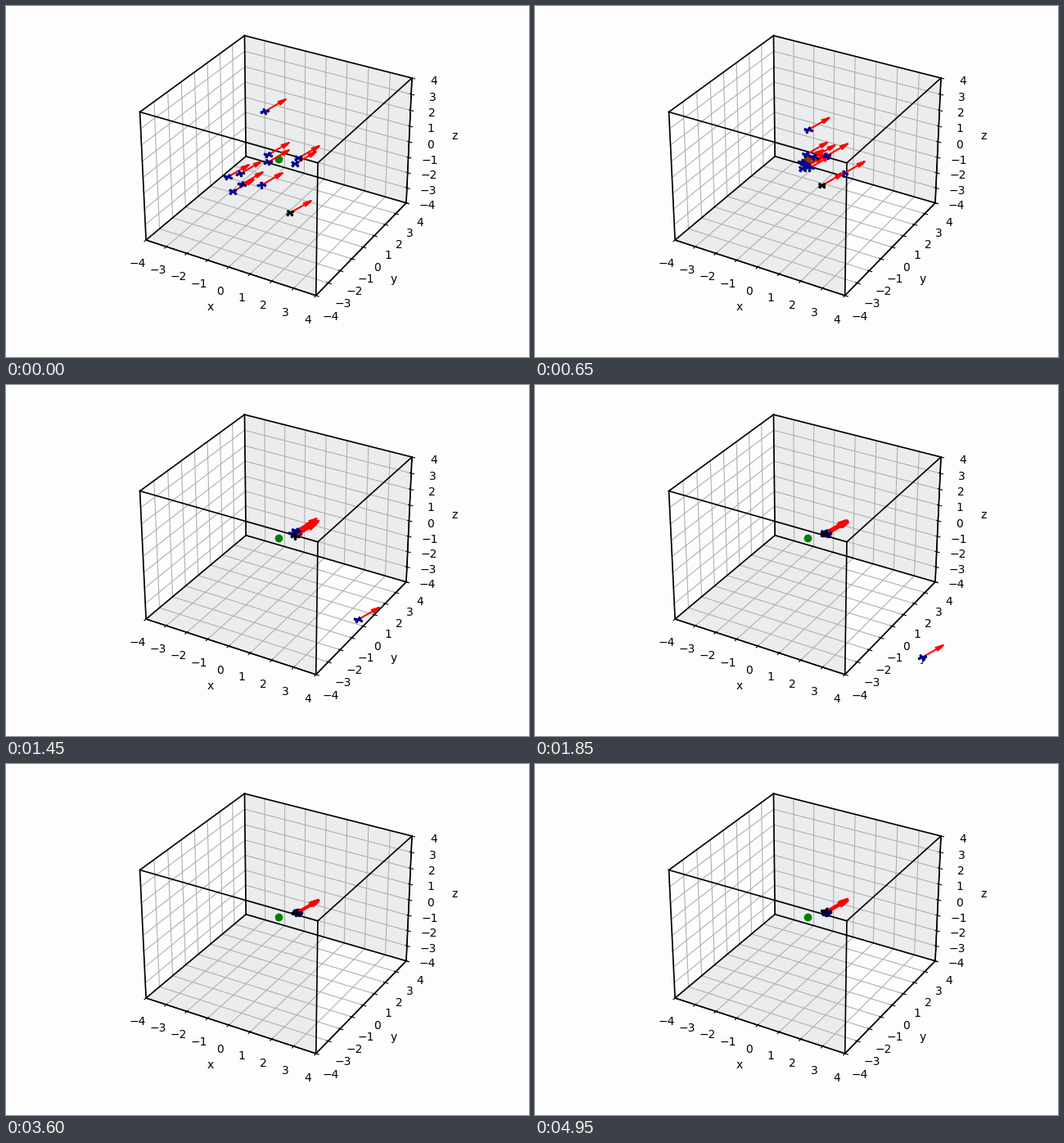
Animation of 639x429 px, one loop 5 s. Source, as a matplotlib script:

```python
import itertools

import matplotlib.pyplot as plt
import numpy as np
from matplotlib.animation import FuncAnimation
from mpl_toolkits.mplot3d import proj3d

W, H, DPI = 639, 429, 100
FRAMES, STEP = 100, 50
PAPER, SHADE = "#fdfdfd", "#ebecee"
LIM = 4

fig = plt.figure(figsize=(W / DPI, H / DPI), dpi=DPI, facecolor=PAPER)


def pixel_axes(zorder):
    """Full-stage axes in pixels with y pointing down."""
    layer = fig.add_axes([0, 0, 1, 1], zorder=zorder)
    layer.set(xlim=(0, W), ylim=(H, 0))
    layer.axis("off")
    return layer


# Room with ticks, grid and outline
back = pixel_axes(-1)
side = 369.6
room = fig.add_axes([143.2 / W, 51.8 / H, side / W, side / H], projection="3d")
room.set_facecolor("none")
room.set(xlim=(-LIM, LIM), ylim=(-LIM, LIM), zlim=(-LIM, LIM),
         xlabel="x", ylabel="y", zlabel="z")
for axis in (room.xaxis, room.yaxis, room.zaxis):
    axis.set_pane_color((1, 1, 1, 0))
    axis.set_ticks(range(-LIM, LIM + 1))

corners = list(itertools.product((-LIM, LIM), repeat=3))
for p, q in itertools.combinations(corners, 2):
    if sum(a != b for a, b in zip(p, q)) == 1:
        room.plot(*zip(p, q), color="black", lw=1.2)


def to_pixels(x, y, z):
    u, v, _ = proj3d.proj_transform(x, y, z, room.get_proj())
    px, py = room.transData.transform((u, v))
    return np.array([px, H - py])


far_left, far_right = to_pixels(-LIM, LIM, -LIM), to_pixels(LIM, LIM, -LIM)
near_left, near_right = to_pixels(-LIM, -LIM, -LIM), to_pixels(LIM, -LIM, -LIM)
near_top = to_pixels(LIM, -LIM, LIM)

# Where the front upright crosses the far floor edge
s, _ = np.linalg.solve(np.column_stack([far_right - far_left, near_right - near_top]),
                       near_right - far_left)
crossing = far_left + s * (far_right - far_left)
wall = [to_pixels(-LIM, LIM, LIM), to_pixels(LIM, LIM, LIM), far_right, far_left]
floor = [near_left, far_left, crossing, near_right]
for shape in (wall, floor):
    back.fill(*np.array(shape).T, color=SHADE, lw=0)

# Swarm: start point and time scale of the approach; the last one is black
top = pixel_axes(1)
top.plot(*to_pixels(0, 0, 0), "o", color="green", ms=6, zorder=1)

STARTS = np.array([(316, 129), (320, 182), (320, 191), (357, 186), (271, 209),
                   (286, 205), (288, 218), (277, 227), (312, 219), (347, 253)])
SCALES = np.array([853, 1050, 700, 700, 640, 680, 650, 660, 720, 820])
GOAL = np.array([355, 181.5])
ESCAPE_T = (0, 550, 650, 1050, 1100, 1650, 1850, 2000)
ESCAPE_X = (353, 374, 377, 393, 397, 449, 473, 487)
ESCAPE_Y = (193, 201, 205, 239, 243, 312, 333, 356)

ARROW = np.array([25.5, -14.8])
NORMAL = np.array([14.8, 25.5]) / 29.5
BARB = 0.7 * ARROW

rng = np.random.default_rng(4)
count = len(STARTS) + 1
spread = rng.uniform(-1.6, 1.6, (count, 2)) * (1, 0.6)
spread[-1] = -1, -0.3
jitter = rng.normal(0, 0.45, (FRAMES, count, 2))
yaw = rng.uniform(0, np.pi, (FRAMES, count))


class Drone:
    def __init__(self, color, order):
        self.arms = [top.plot([], [], color=color, lw=1.9, zorder=order)[0]
                     for _ in range(2)]
        self.rotors, = top.plot([], [], "o", color=color, ms=2.1, mec="black",
                                mew=0.35, zorder=order)
        self.arrow, = top.plot([], [], color="red", lw=1.5, zorder=order - 0.5)
        self.parts = [*self.arms, self.rotors, self.arrow]

    def place(self, pos, angle):
        angles = angle + np.arange(4) * np.pi / 2
        tips = pos + np.column_stack([4.1 * np.cos(angles), 2.6 * np.sin(angles)])
        for arm, ends in zip(self.arms, (tips[::2], tips[1::2])):
            arm.set_data(*ends.T)
        self.rotors.set_data(*tips.T)
        tip = pos + ARROW
        points = [pos, tip, pos + BARB + 2 * NORMAL, tip, pos + BARB - 2 * NORMAL]
        self.arrow.set_data(*np.array(points).T)

    def show(self, on):
        for part in self.parts:
            part.set_visible(on)


runner = Drone("#0000c8", 3)
drones = [Drone("#0000c8", 3) for _ in STARTS[:-1]] + [Drone("black", 4)]


def update(i):
    t = i * STEP
    runner.show(t <= ESCAPE_T[-1])
    runner.place(np.array([np.interp(t, ESCAPE_T, ESCAPE_X),
                           np.interp(t, ESCAPE_T, ESCAPE_Y)]), yaw[i, 0])
    for k, drone in enumerate(drones):
        left = np.exp(-(t / SCALES[k]) ** 2)
        rest = GOAL + spread[k + 1] + jitter[i, k + 1]
        drone.place(rest + (STARTS[k] - rest) * left, yaw[i, k + 1])
    return []


anim = FuncAnimation(fig, update, frames=FRAMES, interval=STEP, repeat=True)
plt.show()
```
